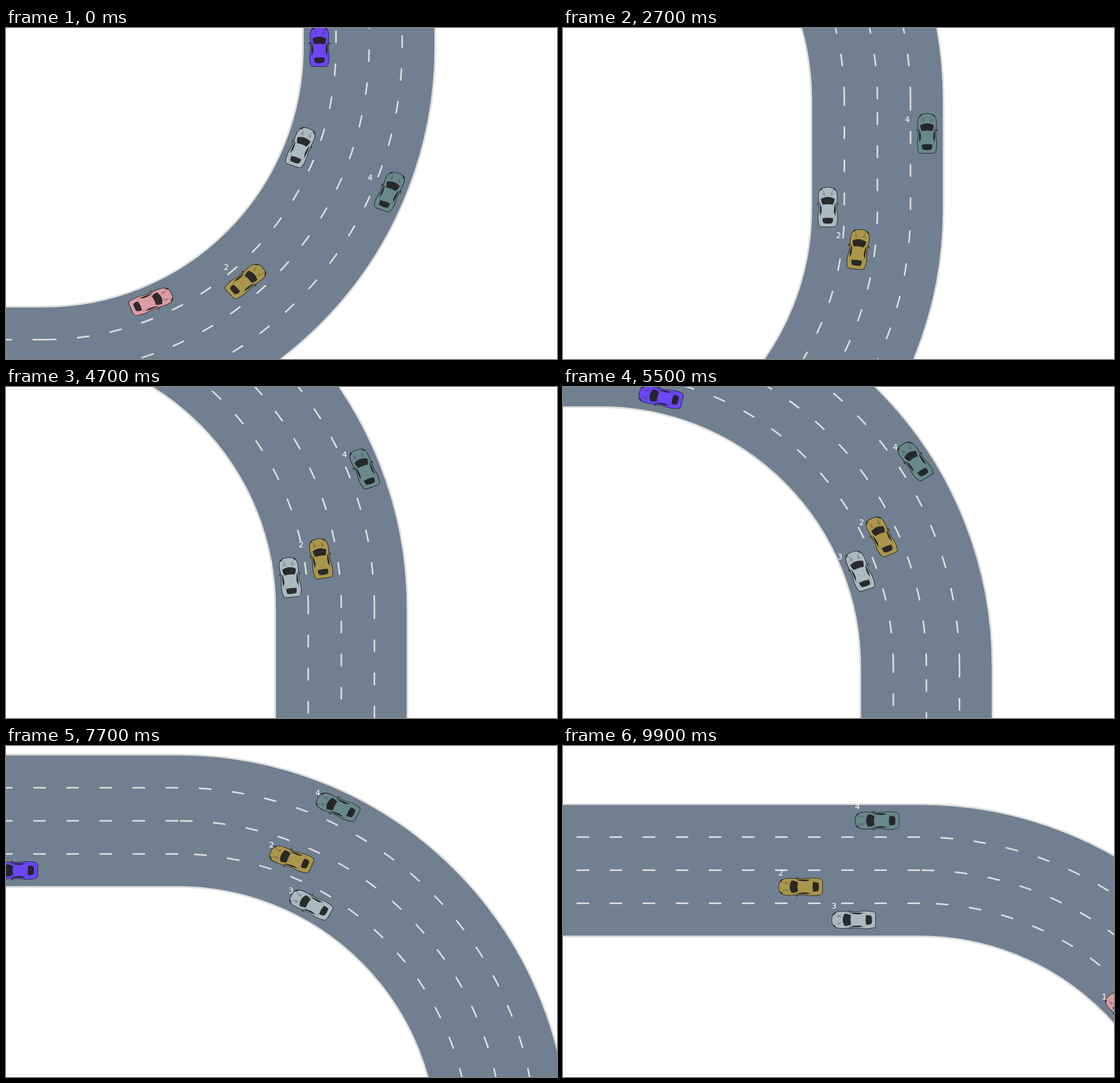
Animation of 966x580 px, one loop 10000 ms. Source, as an HTML page with a canvas:

```html
<!DOCTYPE html>
<html lang="en">
<head>
<meta charset="utf-8">
<title>Cars on a four-lane bend</title>
<style>
  html, body { margin: 0; height: 100%; overflow: hidden; background: #fff; }
  canvas { display: block; }
</style>
</head>
<body>
<canvas id="stage" width="966" height="580"></canvas>
<script>
const ctx = document.getElementById('stage').getContext('2d');
const W = 966, H = 580, HALF = Math.PI / 2;
const LANE = 58, INNER = 454, SIDE = 193.5, FAR = 2000;
const STRETCH_X = 1.049, STRETCH_Y = 0.953;

// Distance along the lane (px) at each of these simulation ticks
const TICKS = [0, 11, 18, 26, 45, 61, 75, 97];
const START_SPEED = 5;
const cars = [
  { lane: 0, color: '#dc9ca4', way: [193.3, 299.9, 366, 441, 629.5, 820.5, 1003.3, 1308] },
  { lane: 1, color: '#aa964c', way: [386.3, 512.6, 633, 780.3, 1129.8, 1427.1, 1690.1, 2102.1] },
  { lane: 0, color: '#abbac0', way: [580, 644.2, 694.2, 763.3, 1005.4, 1246.3, 1468.3, 1826.9] },
  { lane: 3, color: '#68888c', way: [773, 916.1, 1032.5, 1165.6, 1475.3, 1737.3, 1968.8, 2332.5] },
  { lane: 0, color: '#6b47f5', way: [760.2, 883, 995, 1131.3, 1464.7, 1747.4, 1995.4, 2382.4] }
];

const body = new Path2D('M-10 -33.5Q0 -36.5 10 -33.5C15 -31 17 -24 16.4 -15C15.6 -8 15.3 -2 15.6 6' +
  'C17.8 15 17.6 24 15 32.5Q14 34.5 9 34.8H-9Q-14 34.5 -15 32.5C-17.6 24 -17.8 15 -15.6 6' +
  'C-15.3 -2 -15.6 -8 -16.4 -15C-17 -24 -15 -31 -10 -33.5Z');
const mirrors = new Path2D('M-15.6 -8L-18.6 -6.3L-18 -4.6L-15.4 -5.5M15.6 -8L18.6 -6.3L18 -4.6L15.4 -5.5');
const glass = new Path2D('M-12 -14.5Q0 -21 12 -14.5Q12 -9 8.8 -4.2Q0 -6 -8.8 -4.2Q-12 -9 -12 -14.5Z' +
  'M-9 19.5Q0 18 9 19.5Q10 24 7.5 28.2Q0 30 -7.5 28.2Q-10 24 -9 19.5Z' +
  'M-13.6 -8Q-10.6 -1 -10.8 9L-13.6 16Q-14.2 4 -13.6 -8Z' +
  'M13.6 -8Q10.6 -1 10.8 9L13.6 16Q14.2 4 13.6 -8Z' +
  'M-14.5 -28Q-13 -33 -8.5 -33.6Q-10 -30.5 -14.5 -28ZM14.5 -28Q13 -33 8.5 -33.6Q10 -30.5 14.5 -28Z');
const creases = new Path2D('M-9 -31Q-8 -24 -4.5 -19M9 -31Q8 -24 4.5 -19M-9.5 -21L-5.5 -26M9.5 -21L5.5 -26M-8.5 -21L-5 -24M8.5 -21L5 -24');
const lamps = new Path2D('M-13 18.5L-10.5 17.5M13 18.5L10.5 17.5');

// Cubic through the known distances, with tangents from neighbouring slopes
function travelled(way, tick) {
  const slope = i => (way[i + 1] - way[i]) / (TICKS[i + 1] - TICKS[i]);
  const last = TICKS.length - 1;
  const tangent = i => {
    if (i === 0) return START_SPEED;
    if (i === last) return slope(last - 1);
    const a = TICKS[i] - TICKS[i - 1], b = TICKS[i + 1] - TICKS[i];
    return (slope(i - 1) * b + slope(i) * a) / (a + b);
  };
  let i = 0;
  while (i < last - 1 && tick >= TICKS[i + 1]) i++;
  const h = TICKS[i + 1] - TICKS[i], u = (tick - TICKS[i]) / h, w = 1 - u;
  return way[i] * w * w * (1 + 2 * u) + way[i + 1] * u * u * (3 - 2 * u) +
    h * u * w * (tangent(i) * w - tangent(i + 1) * u);
}

// Position and heading, measured from the centre of the upper bend
function place(r, s) {
  const bend = r * HALF;
  if (s < bend) {
    const a = s / r;
    return { x: r * Math.sin(a), y: SIDE + r * Math.cos(a), turn: HALF - a };
  }
  s -= bend;
  if (s < SIDE) return { x: r, y: SIDE - s, turn: 0 };
  s -= SIDE;
  if (s < bend) {
    const a = s / r;
    return { x: r * Math.cos(a), y: -r * Math.sin(a), turn: -a };
  }
  return { x: bend - s, y: -r, turn: -HALF };
}

function trace(r) {
  ctx.beginPath();
  ctx.moveTo(-FAR, SIDE + r);
  ctx.arc(0, SIDE, r, HALF, 0, true);
  ctx.arc(0, 0, r, 0, -HALF, true);
  ctx.lineTo(-FAR, -r);
  ctx.stroke();
}

function dashes(r) {
  const part = draw => { ctx.beginPath(); draw(); ctx.stroke(); };
  part(() => { ctx.moveTo(-20 - 20 * LANE, SIDE + r); ctx.lineTo(0, SIDE + r); });
  part(() => { ctx.arc(0, SIDE, r, HALF, 0, true); ctx.lineTo(r, 0); });
  part(() => ctx.arc(0, 0, r, 0, -HALF, true));
  part(() => { ctx.moveTo(0, -r); ctx.lineTo(-FAR, -r); });
}

function drawRoad() {
  ctx.strokeStyle = '#708090';
  ctx.lineWidth = 4 * LANE;
  trace(INNER + 2 * LANE);
  ctx.strokeStyle = '#dedede';
  ctx.lineWidth = 3;
  trace(INNER);
  trace(INNER + 4 * LANE);
  ctx.lineWidth = 2.8;
  ctx.setLineDash([22, 36]);
  for (let i = 1; i < 4; i++) dashes(INNER + i * LANE);
  ctx.setLineDash([]);
}

function drawCar(spot, color, label) {
  ctx.save();
  ctx.translate(spot.x, spot.y);
  ctx.save();
  ctx.scale(STRETCH_X, STRETCH_Y);
  ctx.rotate(spot.turn);
  ctx.scale(1 / STRETCH_X, 1 / STRETCH_Y);
  ctx.fillStyle = color;
  ctx.strokeStyle = '#1c1c1c';
  ctx.lineWidth = 0.9;
  for (const shape of [mirrors, body]) { ctx.fill(shape); ctx.stroke(shape); }
  ctx.fillStyle = 'rgba(32,32,32,.92)';
  ctx.fill(glass);
  ctx.lineWidth = 0.6;
  ctx.strokeStyle = 'rgba(80,45,45,.6)';
  ctx.stroke(creases);
  ctx.strokeStyle = 'rgba(160,50,50,.7)';
  ctx.stroke(lamps);
  ctx.restore();
  ctx.fillStyle = '#fff';
  ctx.fillText(label, -39, -19.5);
  ctx.restore();
}

function frame(now) {
  // The simulation moves ten times a second and pauses for two steps
  const step = Math.floor(now % 10000 / 100);
  const tick = step - (step >= 6) - (step >= 46);
  const spots = cars.map(c => place(INNER + (c.lane + 0.5) * LANE, travelled(c.way, tick)));
  const mean = axis => spots.reduce((sum, p) => sum + p[axis], 0) / spots.length;

  ctx.setTransform(1, 0, 0, 1, 0, 0);
  ctx.fillStyle = '#fff';
  ctx.fillRect(0, 0, W, H);
  ctx.translate(W / 2 - mean('x'), H / 2 - mean('y'));
  ctx.font = '14px "DejaVu Sans", sans-serif';
  drawRoad();
  spots.forEach((spot, i) => drawCar(spot, cars[i].color, i + 1));
}

const start = performance.now();
function loop() {
  frame(performance.now() - start);
  requestAnimationFrame(loop);
}
loop();
</script>
</body>
</html>
```
